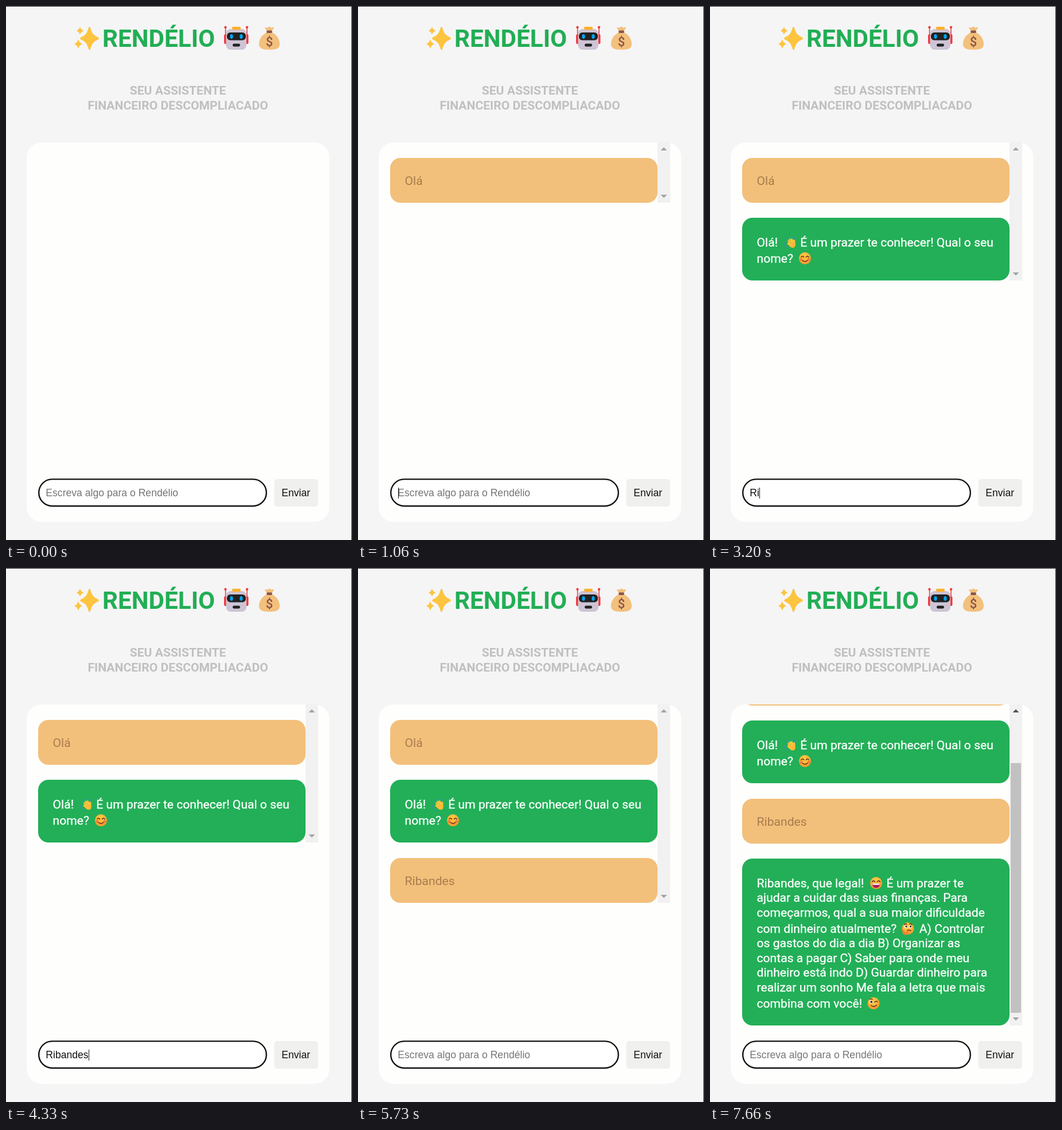
Write an HTML page that moves like this. It is 603 by 928 pixels and loops after 8 s.

```html
<!DOCTYPE html>
<html lang="pt-BR">
<head>
<meta charset="utf-8">
<title>Rendélio</title>
<style>
  html, body { margin: 0; width: 100%; height: 100%; overflow: hidden; background: #f5f5f5; }
  svg { display: block; }
  text { white-space: pre; }
  .brand { font: 700 42.24px Roboto, sans-serif; fill: #22ae55; }
  .tagline { font: 700 21.12px Roboto, sans-serif; fill: #c0c0c2; text-anchor: middle; }
  .user, .bot { font: 21.12px Roboto, sans-serif; fill: #a87c50; }
  .bot { fill: #fff; }
  .bot text { stroke: #fff; stroke-width: .3; }
  .user rect { fill: #f2c07a; }
  .bot rect { fill: #22af57; }
  .field { font: 17.6px "Liberation Sans", Arial, sans-serif; fill: #111; }
  .line { fill: none; stroke: #5f2f22; stroke-width: 1.5; stroke-linecap: round; }
</style>
</head>
<body>
<svg width="603" height="928" viewBox="0 0 603 928">
  <defs>
    <radialGradient id="skin" cx=".45" cy=".3" r=".75">
      <stop offset=".3" stop-color="#ffc23f"/><stop offset="1" stop-color="#fb912b"/>
    </radialGradient>
    <clipPath id="view"><rect x="56" y="237" width="488" height="558"/></clipPath>
    <path id="star" d="M0-1C.2-.4 .4-.22 1 0C.4 .22 .22 .4 0 1C-.22 .4-.4 .22-1 0C-.4-.22-.22-.4 0-1Z"
      fill="#fcc43f" stroke="#fcc43f" stroke-width=".2" stroke-linejoin="round"/>
    <circle id="face" r="10.5" fill="url(#skin)"/>
    <g id="wave">
      <g transform="translate(1.5 1) scale(.88)">
        <g fill="none" stroke="#ffc43d" stroke-width="3.4" stroke-linecap="round">
          <path d="M-5-4L1 3M-2.500-7L4 1M1.500-7.500L6 0M6.500-5L7 3M-5.500 1L1 7"/>
        </g>
        <path d="M-2 1L6-3Q10 2 8 7Q5 11 0 8Z" fill="#ffb936"/>
      </g>
      <path d="M-9.500 1Q-9.500 6-5 8.500M-7.500-2.500Q-9-6-6-8.500M4-9.500Q8.500-9 9-4.500" fill="none" stroke="#3f8fae" stroke-width="1.500" stroke-linecap="round"/>
    </g>
    <g id="smile">
      <use href="#face"/>
      <g fill="#f5653b" opacity=".65"><circle cx="-6.7" cy="2" r="2.5"/><circle cx="6.7" cy="2" r="2.5"/></g>
      <path class="line" d="M-6.5-2Q-4.2-5.5-2-2M2-2Q4.2-5.5 6.5-2M-4.5 3.5Q0 7.5 4.5 3.5"/>
    </g>
    <g id="grin">
      <use href="#face"/>
      <path class="line" d="M-7-2Q-4.5-6-2-2M2-2Q4.5-6 7-2"/>
      <path d="M-7 1H7Q6 8.5 0 8.5T-7 1Z" fill="#a7185c"/>
      <path d="M-6.5 1H6.5L5.8 3.2H-5.8Z" fill="#fff"/>
    </g>
    <g id="think">
      <use href="#face"/>
      <g fill="#fff"><circle cx="-3.5" cy="-3" r="2.8"/><circle cx="4" cy="-3" r="2.8"/></g>
      <g fill="#432c25"><circle cx="-3" cy="-3.5" r="1.7"/><circle cx="4.5" cy="-3.5" r="1.7"/></g>
      <path class="line" d="M-6.5-7Q-4-8.5-2-7.5M2.5-8Q5.5-9 7-6.5M-1 3.5Q2 2 5 4"/>
      <path d="M-10 3Q-8 1-7 4L-6 6L1 4Q3 5 0 6.5Q2 11-4 11Q-10 11-10 3Z" fill="#ff8330"/>
    </g>
    <g id="wink">
      <use href="#face"/>
      <circle cx="-4" cy="-2.5" r="2.8" fill="#fff"/><circle cx="-3.7" cy="-2.5" r="1.9" fill="#432c25"/>
      <path class="line" d="M-6.5-7Q-4-8.5-2-7M2-2Q4.5-5 7-2.5M-4.5 3.5Q1 8 5.5 3"/>
    </g>
  </defs>

  <rect width="603" height="928" fill="#f5f5f5"/>
  <path d="M0 .5H602.5V928" fill="none" stroke="#222"/>

  <use href="#star" transform="translate(145.5 56.3) scale(14.8 18.2)"/>
  <use href="#star" transform="translate(129 43) scale(5.2 5.6)"/>
  <use href="#star" transform="translate(126 66) scale(6.2 6.6)"/>
  <text class="brand" x="168" y="70.5">RENDÉLIO</text>

  <g fill="#f23b3b">
    <circle cx="382.5" cy="37" r="2.2"/><circle cx="420" cy="37" r="2.2"/>
    <path d="M381.8 37h1.6v14h-1.6zM419.2 37h1.6v14h-1.6z"/>
    <rect x="380" y="49" width="7" height="17" rx="2.5"/><rect x="415.5" y="49" width="7" height="17" rx="2.5"/>
  </g>
  <rect x="383.5" y="40" width="35.5" height="36" rx="8" fill="#cdc4d6"/>
  <rect x="394" y="36" width="15" height="5.5" rx="2" fill="#fcb12f"/>
  <rect x="385" y="46" width="33" height="13.5" rx="6" fill="#212121"/>
  <g fill="#00a6ed"><ellipse cx="393" cy="53" rx="2.7" ry="4"/><ellipse cx="410" cy="53" rx="2.7" ry="4"/></g>
  <rect x="395" y="65.5" width="13" height="5" rx="2.4" fill="#212121"/>

  <path d="M454 46C446 50 441 58 441 66C441 73 446 76 459 76S477 73 477 66C477 58 472 50 464 46ZM455 44L451 38Q453 36 456 38Q459 33.5 462 38Q465 36 467 38L463 44Z" fill="#f3c07d"/>
  <rect x="454" y="42.5" width="10" height="4.5" rx="2.2" fill="#8c5543"/>
  <text x="459" y="69.5" text-anchor="middle" font-family="Roboto, sans-serif" font-size="22" font-weight="500" fill="#8c5543">$</text>

  <text class="tagline" x="299.6" y="154">SEU ASSISTENTE</text>
  <text class="tagline" x="299.6" y="179.5">FINANCEIRO DESCOMPLIACADO</text>

  <rect x="36" y="237" width="527.5" height="659.5" rx="26" fill="#fefefd"/>
  <g clip-path="url(#view)"><g id="messages"></g></g>

  <g id="scrollbar">
    <rect id="track" x="522" y="237" width="22" fill="#f1f1f1"/>
    <rect id="thumb" x="524" y="339" width="18" height="434" fill="#c1c1c1"/>
    <path id="up" d="M527.5 251L533 245.5L538.5 251Z"/>
    <path id="down" d="M527.5-14L533-8.5L538.5-14Z" fill="#a3a3a3"/>
  </g>

  <rect x="57.2" y="822.4" width="396.6" height="46.6" rx="23.3" fill="#fff" stroke="#111" stroke-width="2.4"/>
  <text id="input" class="field" x="69.3" y="851.5"></text>
  <rect id="caret" y="837" width="1" height="19" fill="#111"/>
  <rect x="467.5" y="822" width="76.5" height="48" rx="5.5" fill="#f0f0ee"/>
  <text class="field" x="480.2" y="851.5">Enviar</text>
</svg>

<script>
const LOOP = 8000;
const $ = id => document.getElementById(id);

// Line items: [x, baseline offset inside the bubble, text]; emoji: [id, x, y offset].
const messages = [
  { at: 1060, who: 'user', y: 264, h: 78, lines: [[81.5, 46.5, 'Olá']] },
  { at: 2200, who: 'bot', y: 368, h: 109, lines: [
      [81.5, 49.5, 'Olá!'], [157.3, 49.5, 'É um prazer te conhecer! Qual o seu'],
      [81.5, 77.5, 'nome?']],
    emoji: [['wave', 139.5, 43], ['smile', 165.5, 70.5]] },
  { at: 4530, who: 'user', y: 504, h: 78, lines: [[81.5, 46.5, 'Ribandes']] },
  { at: 5800, who: 'bot', y: 608, h: 290, lines: [
      [81.5, 49.5, 'Ribandes, que legal!'], [307.5, 49.5, 'É um prazer te'],
      [81.5, 75, 'ajudar a cuidar das suas finanças. Para'],
      [81.5, 100.5, 'começarmos, qual a sua maior dificuldade'],
      [81.5, 128.5, 'com dinheiro atualmente?'], [364.8, 128.5, 'A) Controlar'],
      [81.5, 154, 'os gastos do dia a dia B) Organizar as'],
      [81.5, 179.5, 'contas a pagar C) Saber para onde meu'],
      [81.5, 205, 'dinheiro está indo D) Guardar dinheiro para'],
      [81.5, 230.5, 'realizar um sonho Me fala a letra que mais'],
      [81.5, 258.5, 'combina com você!']],
    emoji: [['grin', 289.5, 42.5], ['think', 345, 121.5], ['wink', 285, 251.5]] },
];
const words = [
  { text: 'Olá', keys: [200, 400, 600], sent: 1060 },
  { text: 'Ribandes', keys: [2800, 3200, 3800, 4000, 4070, 4200, 4270, 4330], sent: 4530 },
];
const caretToggles = [200, 1130, 1660, 1930, 2460, 3730, 3800, 4860, 5400, 5730, 6060, 6600, 7130, 7660];

$('messages').innerHTML = messages.map(({ who, y, h, lines, emoji = [] }) =>
  `<g class="${who}"><rect x="56" y="${y}" width="466" height="${h}" rx="18"/>` +
  lines.map(([x, dy, text]) => `<text x="${x}" y="${y + dy}">${text}</text>`).join('') +
  emoji.map(([id, x, dy]) => `<use href="#${id}" x="${x}" y="${y + dy}"/>`).join('') + '</g>'
).join('');
const bubbles = [...$('messages').children];

const show = (el, on) => el.setAttribute('visibility', on ? 'visible' : 'hidden');
const passed = (times, t) => times.filter(time => time <= t).length;

function render(t) {
  messages.forEach((m, i) => show(bubbles[i], t >= m.at));
  const last = messages.filter(m => t >= m.at).pop();
  const bottom = last ? Math.min(last.y + last.h, 795) : 237;
  const scroll = last ? last.y + last.h - bottom : 0;
  $('messages').setAttribute('transform', `translate(0 ${-scroll})`);

  $('scrollbar').style.display = last ? '' : 'none';
  $('track').setAttribute('height', bottom - 237);
  $('down').setAttribute('transform', `translate(0 ${bottom})`);
  $('up').setAttribute('fill', scroll ? '#505050' : '#a3a3a3');
  $('thumb').style.display = scroll ? '' : 'none';

  const word = words.find(w => t < w.sent);
  const typed = word ? word.text.slice(0, passed(word.keys, t)) : '';
  const input = $('input');
  input.textContent = typed || 'Escreva algo para o Rendélio';
  input.style.fill = typed ? '#111' : '#757575';
  const advance = typed ? input.getComputedTextLength() : 0;
  $('caret').setAttribute('x', Math.round(69.8 + advance));
  show($('caret'), passed(caretToggles, t) % 2);
}

const start = performance.now();
function tick() {
  render((performance.now() - start) % LOOP);
  requestAnimationFrame(tick);
}
tick();
</script>
</body>
</html>
```
